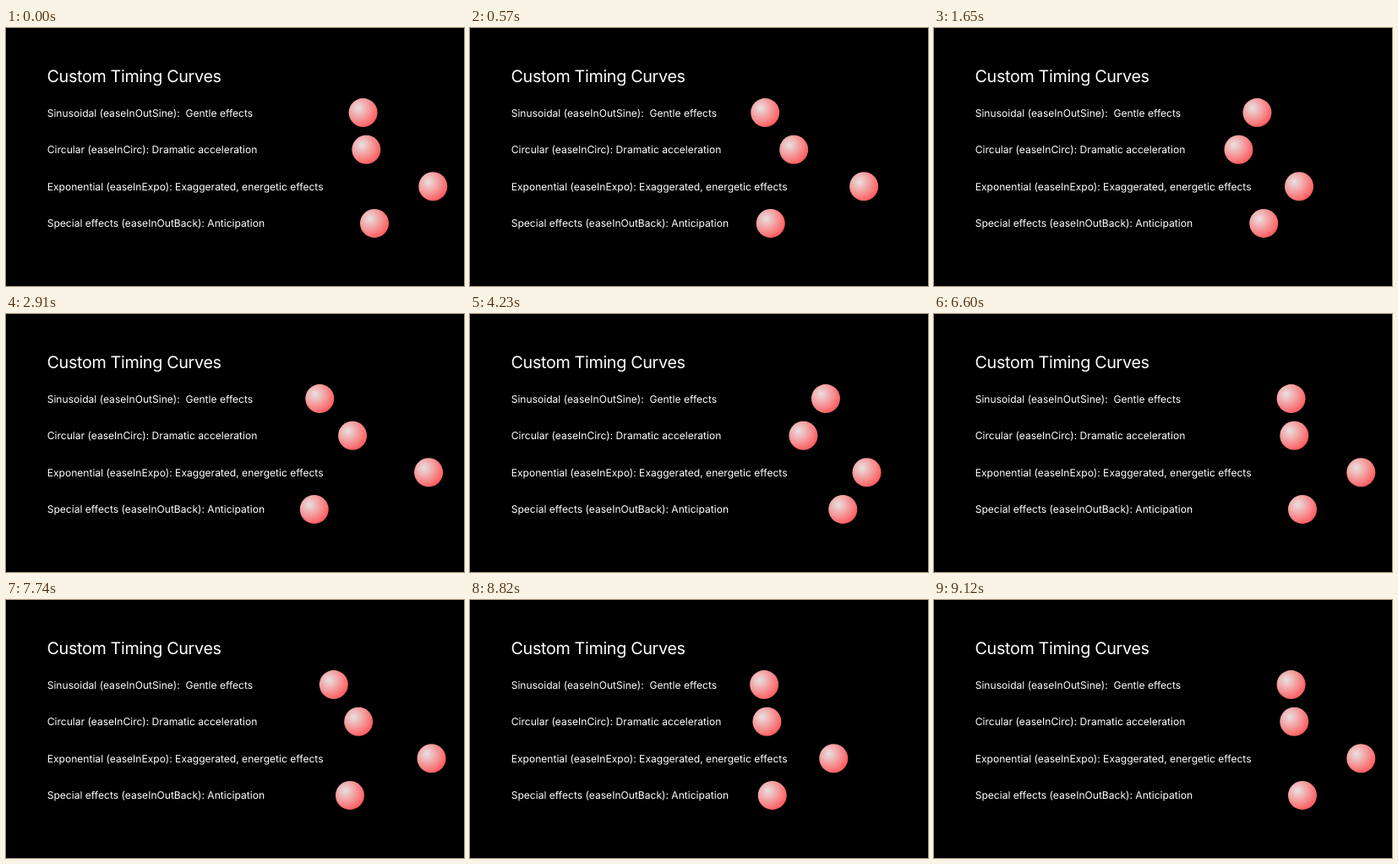
An HTML page that plays this animation: 542x305 px, repeating every 9.84 s.

```html
<!DOCTYPE html>
<html lang="en">
<head>
<meta charset="utf-8">
<title>Custom Timing Curves</title>
<style>
  html, body { margin: 0; width: 100%; height: 100%; overflow: hidden; background: #000; }
  svg { display: block; width: 100%; height: 100%; }
  text {
    font: 12.09px Inter, sans-serif; fill: #fff; white-space: pre;
    font-optical-sizing: none; text-rendering: geometricPrecision;
  }
  .title { font-size: 19.75px; letter-spacing: -.34px; }
</style>
</head>
<body>
<svg id="stage" viewBox="0 0 542 305">
  <defs>
    <radialGradient id="shine" cx=".34" cy=".34" r=".72">
      <stop offset="0" stop-color="#e8e1e1"/>
      <stop offset="1" stop-color="#ff595b"/>
    </radialGradient>
  </defs>
  <text class="title" x="48.5" y="64.3">Custom Timing Curves</text>
</svg>
<script>
const LOOP = 9840, STEP = 30, TRAVEL = 75;

// Cubic Bezier easing: bisect for the parameter at x, then return y.
function bezier(x1, y1, x2, y2) {
  const at = (a, b, s) => 3 * (1 - s) ** 2 * s * a + 3 * (1 - s) * s * s * b + s ** 3;
  return x => {
    if (x <= 0) return 0;
    if (x >= 1) return 1;
    let low = 0, high = 1;
    for (let i = 0; i < 30; i++) {
      const mid = (low + high) / 2;
      if (at(x1, x2, mid) < x) low = mid; else high = mid;
    }
    return at(y1, y2, low);
  };
}

const rows = [
  { label: "Sinusoidal (easeInOutSine):  Gentle effects", left: 347.6, ease: bezier(.37, 0, .63, 1) },
  { label: "Circular (easeInCirc): Dramatic acceleration", left: 351.3, ease: bezier(.55, 0, 1, .45) },
  { label: "Exponential (easeInExpo): Exaggerated, energetic effects", left: 430.3, ease: bezier(.7, 0, .84, 0) },
  { label: "Special effects (easeInOutBack): Anticipation", left: 361, ease: bezier(.68, -.6, .32, 1.6) }
];

// [start, end] of each move; they alternate leftward and rightward.
const moves = [
  [305, 598], [1500, 1814], [2715, 3030], [3945, 4260],
  [5142, 5457], [6285, 6600], [7605, 7888], [8803, 9118]
];

const stage = document.getElementById("stage");
function add(tag, attributes) {
  const node = document.createElementNS(stage.namespaceURI, tag);
  for (const name in attributes) node.setAttribute(name, attributes[name]);
  return stage.appendChild(node);
}

rows.forEach((row, i) => {
  const y = 100.1 + 43.6 * i;
  add("text", { x: 48.7, y: y + 4.5 }).textContent = row.label;
  row.ball = add("circle", { cy: y, r: 17, fill: "url(#shine)" });
});

function draw(now) {
  const time = Math.floor(now % LOOP / STEP) * STEP;
  const index = moves.findLastIndex(([start]) => start <= time);
  const [start, end] = moves[index] || [-2, -1];
  const progress = Math.min(1, (time - start) / (end - start));
  const leftward = index >= 0 && index % 2 === 0;
  for (const { ball, left, ease } of rows) {
    const eased = ease(progress);
    ball.setAttribute("cx", left + TRAVEL * (leftward ? 1 - eased : eased));
  }
}

const began = performance.now();
function tick() {
  draw(performance.now() - began);
  requestAnimationFrame(tick);
}
tick();
</script>
</body>
</html>
```
